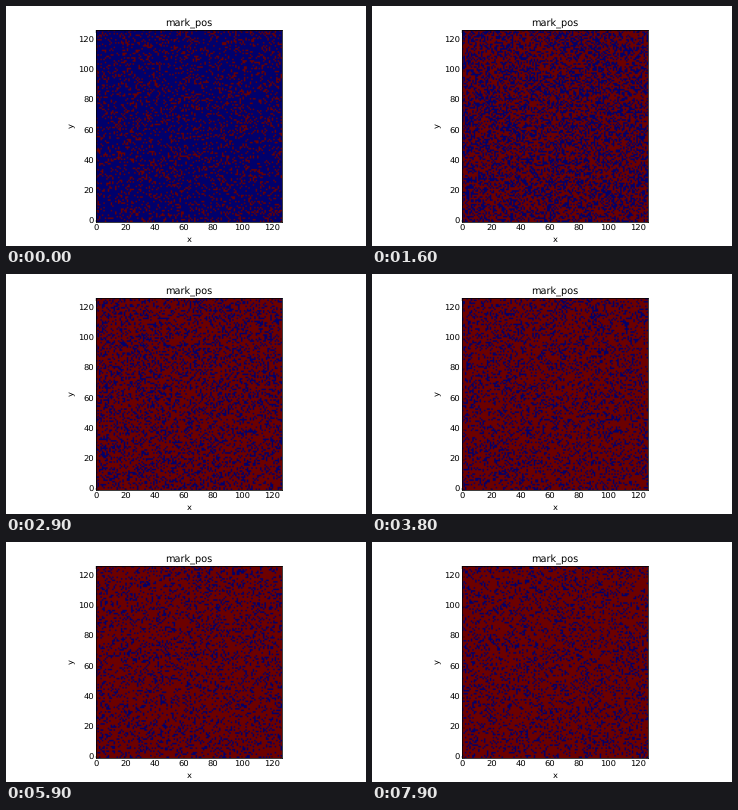
A matplotlib script that plays this animation: 360 px wide and 240 px high, repeating every 8 s.

```python
import numpy as np
import matplotlib.pyplot as plt
from matplotlib.animation import FuncAnimation
from matplotlib.colors import LinearSegmentedColormap

W, H, DPI = 360, 240, 60
FRAMES, INTERVAL = 80, 100
N, ZOOM = 127, 4
START, GAIN, LOSS = 0.21, 0.053, 0.014

plt.rcParams.update({"font.family": "DejaVu Sans", "font.size": 10,
                     "axes.linewidth": 0.9, "text.hinting": "none"})


def simulate():
    """Two-state cells that gain and lose their mark at constant rates."""
    rng = np.random.default_rng(7)
    marked = rng.random((N, N)) < START
    states = [marked]
    for _ in range(FRAMES - 1):
        roll = rng.random((N, N))
        marked = np.where(marked, roll >= LOSS, roll < GAIN)
        states.append(marked)
    return states


def enlarge(state):
    """Oversample the cells so that their edges are smoothed when drawn."""
    return np.kron(state.astype(float), np.ones((ZOOM, ZOOM)))


states = simulate()

fig = plt.figure(figsize=(W / DPI, H / DPI), dpi=DPI, facecolor="white")
ax = fig.add_axes([90 / W, 24 / H, 186 / W, 192 / H])
blue_red = LinearSegmentedColormap.from_list("marks", ["#00006c", "#6c0000"])
cells = ax.imshow(enlarge(states[0]), cmap=blue_red, vmin=0, vmax=1,
                  origin="lower", extent=(0, N, 0, N), aspect="auto",
                  interpolation="hanning")

ticks = range(0, N, 20)
ax.set_xticks(ticks)
ax.set_yticks(ticks)
ax.tick_params(direction="in", length=3, width=0.4, top=True, right=True)
ax.tick_params(axis="x", pad=3.8)
ax.tick_params(axis="y", pad=2.3)
for label in ax.get_yticklabels():
    label.set_va("center")


def put(x, y, text, **kw):
    fig.text(x / W, 1 - y / H, text, ha="center", va="baseline", **kw)


put(183, 20, "mark_pos", size=11.7)
put(183, 236, "x")
put(68.5, 119.5, "y", rotation=90, rotation_mode="anchor")


def update(i):
    cells.set_data(enlarge(states[i]))
    return [cells]


anim = FuncAnimation(fig, update, frames=FRAMES, interval=INTERVAL,
                     repeat=True, repeat_delay=0, blit=False)
plt.show()
```
